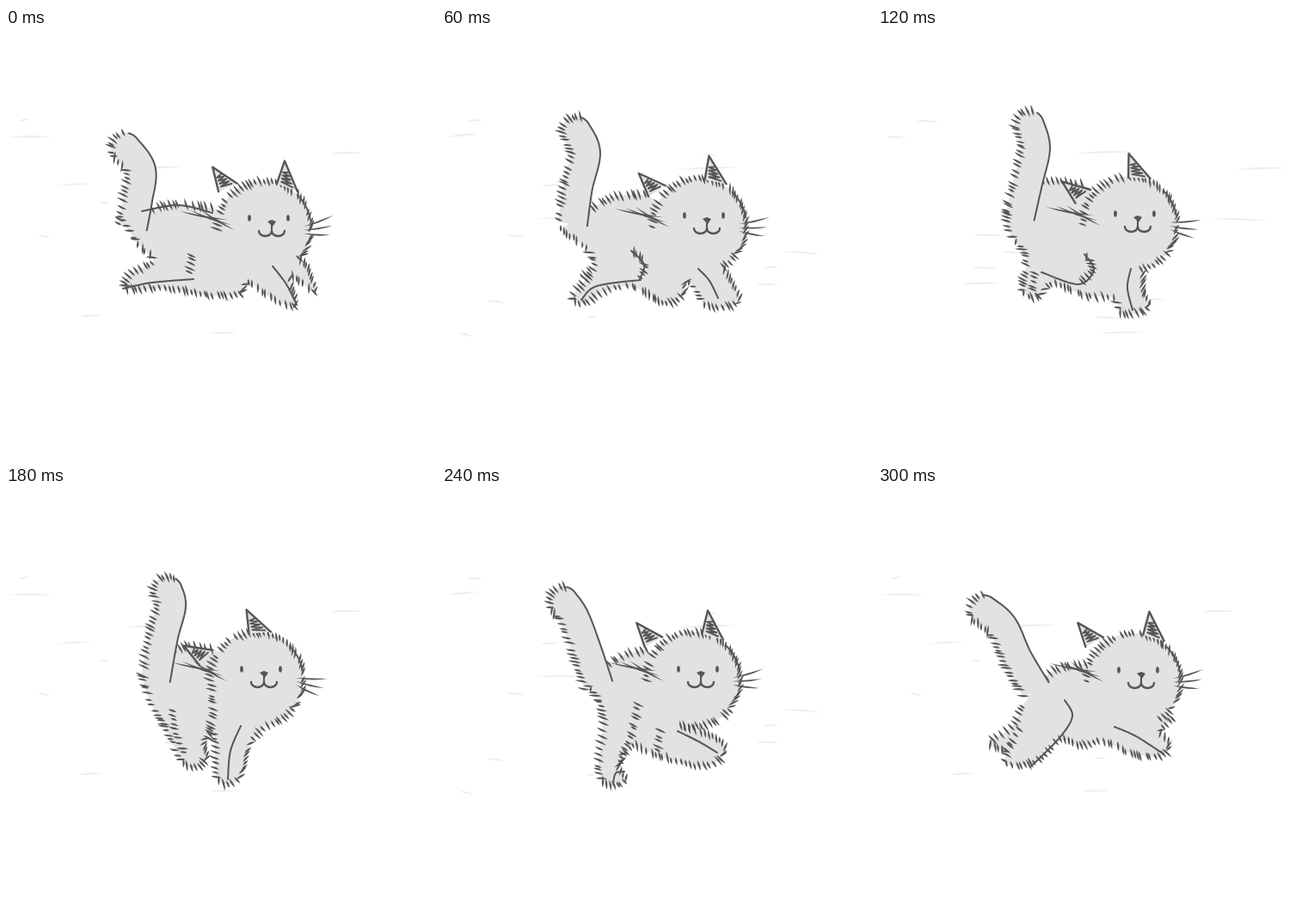
An HTML page with a canvas that plays this animation: 500x500 px, repeating every 0.36 s.

```html
<!DOCTYPE html>
<html lang="en">
<head>
<meta charset="utf-8">
<title>Running cat</title>
<style>
html, body { margin: 0; height: 100%; overflow: hidden; background: #fff; }
canvas { display: block; width: 100vw; height: 100vh; }
</style>
</head>
<body>
<canvas id="stage" width="500" height="500"></canvas>
<script>
const ctx = document.getElementById('stage').getContext('2d');
const INK = '#565656', COAT = '#e2e2e2', AIR = '#eeeeee';
const STEP = 60, HEAD = 55, TAIL = 17, DEG = Math.PI / 180;

let seed = 1;
const rand = () => (seed = seed * 16807 % 2147483647) / 2147483647;
const jitter = n => (rand() - 0.5) * n;
const polar = (x, y, r, deg) => [x + r * Math.cos(deg * DEG), y + r * Math.sin(deg * DEG)];

// Catmull-Rom curve through a flat list x, y, x, y, ...
function curve(flat) {
  const last = flat.length / 2 - 1, out = [];
  const at = (i, k) => flat[2 * Math.max(0, Math.min(last, i)) + k];
  for (let u = 0; u <= last * 10; u++) {
    const i = Math.floor(u / 10), t = u / 10 - i;
    out.push([0, 1].map(k => {
      const a = at(i - 1, k), b = at(i, k), c = at(i + 1, k), d = at(i + 2, k);
      return b + 0.5 * t * (c - a + t * (2 * a - 5 * b + 4 * c - d + t * (3 * (b - c) + d - a)));
    }));
  }
  return out;
}

function arc(x, y, r, from, to) {
  const out = [];
  for (let a = from; a <= to; a += 5) out.push(polar(x, y, r, a));
  return out;
}

function trace(points) {
  ctx.beginPath();
  points.forEach(p => ctx.lineTo(...p));
}

function fill(points, color = COAT) {
  trace(points);
  ctx.fillStyle = color;
  ctx.fill();
}

function pen(points, width = 2) {
  trace(points);
  ctx.strokeStyle = INK;
  ctx.lineWidth = width;
  ctx.stroke();
}

// A bent stroke with thin ends
function hair(x1, y1, x2, y2, w = 2.4, bend = 0.05, color = INK) {
  const dx = x2 - x1, dy = y2 - y1, len = Math.hypot(dx, dy);
  const mx = (x1 + x2) / 2 - dy * bend, my = (y1 + y2) / 2 + dx * bend;
  const nx = -dy / len * w, ny = dx / len * w;
  ctx.beginPath();
  ctx.moveTo(x1, y1);
  ctx.quadraticCurveTo(mx + nx, my + ny, x2, y2);
  ctx.quadraticCurveTo(mx - nx, my - ny, x1, y1);
  ctx.fillStyle = color;
  ctx.fill();
}

// Hairs across a clockwise edge: they lie between its normal and a common slant
function fur(points, gap = 4) {
  let walked = gap;
  for (let i = 1; i < points.length; i++) {
    const [x, y] = points[i], tx = x - points[i - 1][0], ty = y - points[i - 1][1];
    const len = Math.hypot(tx, ty);
    walked += len;
    if (walked < gap) continue;
    walked = jitter(2);
    const flip = tx / len < -0.6 ? -1 : 1;
    const dx = -ty / len * flip + 0.6, dy = tx / len * flip + 0.6;
    const k = (6 + jitter(4)) / Math.hypot(dx, dy), px = x + jitter(2), py = y + jitter(2);
    hair(px - dx * k, py - dy * k, px + dx * k, py + dy * k, 2.4, jitter(0.2));
  }
}

// Tail of even thickness: furry on the left and tip, one line on the right
function tail(flat) {
  const spine = curve(flat), n = spine.length - 1, left = [], right = [];
  let turn;
  spine.forEach(([x, y], i) => {
    const a = spine[Math.max(0, i - 1)], b = spine[Math.min(n, i + 1)];
    turn = Math.atan2(b[1] - a[1], b[0] - a[0]) / DEG;
    left.push(polar(x, y, TAIL, turn - 90));
    right.push(polar(x, y, TAIL, turn + 90));
  });
  const tip = arc(...spine[n], TAIL, turn - 90, turn + 90);
  fill([...left, ...tip, ...right.reverse()]);
  fur([...left, ...tip.slice(0, 28)]);
  pen([...tip.slice(28), ...right]);
}

function ear(x, y, left, tip, right) {
  const a = polar(x, y, ...left), t = polar(x, y, ...tip), b = polar(x, y, ...right);
  const mix = (p, q, k) => [p[0] + (q[0] - p[0]) * k, p[1] + (q[1] - p[1]) * k];
  fill([a, t, b]);
  pen([a, t, b], 2.4);
  const foot = mix(a, b, 0.5), zigzag = [];
  for (let i = 0; i < 9; i++) zigzag.push(mix(mix(foot, i % 2 ? a : b, 0.6), t, 0.08 + i * 0.065));
  pen(zigzag);
}

function face(x, y) {
  ctx.fillStyle = INK;
  for (const eye of [x - 26, x + 19]) {
    ctx.beginPath();
    ctx.ellipse(eye, y - 6, 1.9, 3.7, 0, 0, 7);
    ctx.fill();
  }
  fill([[x - 5, y - 2], [x, y - 4], [x + 5, y - 2], [x + 1, y + 4]], INK);
  pen([[x, y], [x, y + 9]]);
  for (const side of [-7.5, 7.5]) {
    ctx.beginPath();
    ctx.ellipse(x + side, y + 9, 7.5, 6, 0, 0, Math.PI);
    ctx.lineWidth = 2.4;
    ctx.stroke();
  }
}

// The head is a disc around the face; turning it swings ears and whiskers
function head([nx, ny], turn, chin) {
  const x = nx - 9, y = ny + 6;
  fur(arc(x, y, HEAD, 175, 360 + chin));
  pen(arc(x, y, HEAD, 315, 350), 1.8);
  ear(x, y, [68, 219 + turn], [93, 230 + turn], [61, 239 + turn]);
  ear(x, y, [54, 286 + turn], [82, 287 + turn], [58, 312 + turn]);
  face(nx, ny);
  for (let i = 0; i < 3; i++) {
    const px = x + 46, py = y - 2 + 4 * i;
    hair(px, py, ...polar(px, py, 37 - 3 * i, -21 - turn * 0.9 + 12 * i), 2);
    hair(x - 98 + 12 * i, y - 20 - i, x - 42 + 4 * i, y - 10 + 6 * i, 2);
  }
}

// nose: place of the face; under: edge from the chin round the legs to the tail
const poses = [
  {
    nose: [309, 227], turn: 0, chin: 40, air: 1,
    tail: [147, 232, 153, 200, 157, 165, 139, 139],
    back: [160, 212, 200, 205, 242, 210],
    under: [342, 268, 353, 284, 359, 308, 331, 288, 337, 322, 310, 315, 282, 296, 272, 309, 240, 311,
      190, 303, 140, 303, 146, 285, 171, 271, 152, 249, 133, 220],
    lines: [[158, 213, 200, 206, 240, 215], [136, 303, 170, 296, 218, 292], [310, 277, 326, 298, 338, 322]],
    tufts: [[213, 286, 216, 262]]
  },
  {
    nose: [308, 224], turn: -9, chin: 60, air: 2,
    tail: [152, 228, 158, 185, 167, 145, 156, 120],
    back: [168, 214, 200, 196, 238, 194],
    under: [326, 278, 346, 312, 336, 323, 308, 323, 286, 294, 279, 311, 258, 320, 222, 301,
      188, 306, 166, 320, 152, 312, 176, 280, 168, 257, 138, 234],
    lines: [[162, 316, 180, 300, 231, 293], [220, 259, 235, 275, 230, 292], [298, 280, 311, 294, 321, 314]],
    tufts: [[230, 290, 236, 274, 222, 260], [162, 289, 174, 280]]
  },
  {
    nose: [302, 222], turn: -18, chin: 75, air: 3,
    tail: [165, 220, 174, 180, 183, 140, 176, 113],
    back: [190, 178, 213, 178, 240, 182],
    under: [308, 285, 308, 305, 315, 320, 306, 330, 284, 332, 273, 314, 240, 311, 203, 297,
      186, 312, 167, 305, 172, 268, 152, 236, 149, 212],
    lines: [[240, 263, 251, 281, 233, 298, 190, 284], [294, 280, 290, 302, 296, 328]],
    tufts: [[236, 296, 250, 280, 240, 262], [180, 306, 181, 284]]
  },
  {
    nose: [300, 219], turn: -25, chin: 78, air: 1,
    tail: [174, 225, 183, 175, 192, 140, 188, 122],
    back: [195, 190, 215, 186, 242, 190],
    under: [300, 282, 284, 300, 271, 341, 246, 341, 242, 290, 230, 298, 234, 315, 222, 327,
      205, 321, 188, 287, 168, 252, 158, 222],
    lines: [[273, 279, 261, 308, 258, 341]],
    tufts: [[235, 295, 241, 262, 238, 230], [208, 310, 196, 285, 194, 262]]
  },
  {
    nose: [301, 219], turn: -5, chin: 105, air: 2,
    tail: [182, 232, 168, 190, 154, 153, 141, 134],
    back: [184, 216, 208, 198, 236, 190],
    under: [280, 281, 305, 287, 326, 298, 327, 314, 303, 326, 252, 314, 222, 302, 206, 325, 214, 342,
      196, 348, 182, 330, 187, 265, 170, 232],
    lines: [[274, 285, 300, 298, 320, 310], [199, 346, 202, 334, 212, 332]],
    tufts: [[206, 324, 221, 285, 228, 252], [250, 308, 253, 285]]
  },
  {
    nose: [306, 220], turn: -4, chin: 55, air: 1,
    tail: [184, 237, 162, 200, 145, 163, 123, 144],
    back: [187, 227, 210, 212, 240, 207],
    under: [344, 270, 328, 285, 339, 300, 328, 314, 295, 311, 262, 297, 236, 302, 212, 295, 185, 320,
      150, 324, 148, 309, 130, 299, 155, 281, 168, 256],
    lines: [[217, 249, 226, 268, 210, 294, 178, 326], [275, 280, 300, 291, 331, 311]],
    tufts: [[148, 309, 165, 282]]
  }
];

function streaks(kind) {
  seed = kind * 4099;
  for (let y = 108; y < 360; y += 19) {
    const x = rand() * 450, len = 12 + 60 * rand() ** 2;
    hair(x, y, x + len, y + jitter(8), 2.4, -0.03, AIR);
  }
}

function draw(pose) {
  ctx.fillStyle = '#fff';
  ctx.fillRect(0, 0, 500, 500);
  streaks(pose.air);
  const [x, y] = pose.nose, back = curve(pose.back), under = curve(pose.under);
  fill([...back, [x - 9, y + 6], ...under]);
  fill(arc(x - 9, y + 6, HEAD, 0, 360));
  fur(back);
  tail(pose.tail);
  fur(under);
  pose.lines.forEach(l => pen(curve(l)));
  pose.tufts.forEach(t => fur(curve(t)));
  head(pose.nose, pose.turn, pose.chin);
}

ctx.lineCap = ctx.lineJoin = 'round';
let shown = 0;
const start = performance.now();
function tick() {
  const i = Math.floor((performance.now() - start) / STEP) % poses.length;
  if (i !== shown) draw(poses[shown = i]);
  requestAnimationFrame(tick);
}
draw(poses[0]);
requestAnimationFrame(tick);
</script>
</body>
</html>
```
